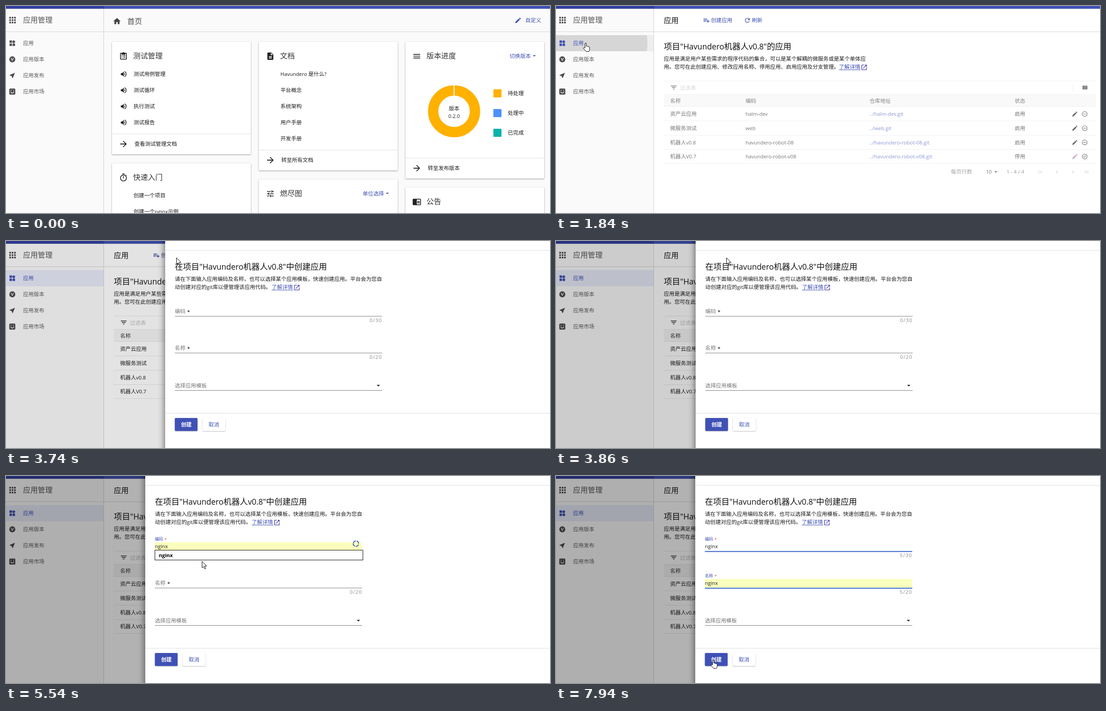
An HTML page for the animation above (8 s loop, 1211 by 462 pixels).

```html
<!DOCTYPE html>
<html lang="zh">
<head>
<meta charset="utf-8">
<style>
html, body { margin: 0; height: 100%; overflow: hidden; background: #fff; }
svg { display: block; width: 100vw; height: 100vh; font-family: "Open Sans", "Noto Sans CJK SC", "Noto Sans CJK", sans-serif; }
.card { filter: drop-shadow(0 1px 1.5px rgba(0,0,0,.4)); }
.button { filter: drop-shadow(0 1px 1px rgba(0,0,0,.28)); }
#sheet { filter: drop-shadow(-2px 0 7px rgba(0,0,0,.5)); }
</style>
</head>
<body>
<svg id="stage" viewBox="0 0 1211 462" xmlns="http://www.w3.org/2000/svg"></svg>
<script>
const BLUE = '#3f51b5', BODY = 11.83, HEAD = 16.4, TITLE = 18.2;

// Icons on a 24 unit grid
const ring = 'M12 2a10 10 0 1 0 0 20 10 10 0 0 0 0-20zm0 18a8 8 0 1 1 0-16 8 8 0 0 1 0 16z';
const icons = {
  apps: [4, 10, 16].map(x => [4, 10, 16].map(y => `M${x} ${y}h4v4h-4z`).join('')).join(''),
  widgets: 'M13 13v8h8v-8zM3 21h8v-8H3zM3 3v8h8V3zm13.66-1.31L11 7.34 16.66 13l5.66-5.66z',
  version: 'M12 2a10 10 0 1 0 0 20 10 10 0 0 0 0-20zM7 7h2.3l2.7 7.5L14.7 7H17l-4 10h-2z',
  send: 'M21 3L3 10.53v.98l6.84 2.65L12.48 21h.98z',
  market: 'M5 2h14a3 3 0 0 1 3 3v14a3 3 0 0 1-3 3H5a3 3 0 0 1-3-3V5a3 3 0 0 1 3-3zM7 6v3h2V6zm8 0v3h2V6zM6 12q1 6 6 6t6-6h-2q-1 4-4 4t-4-4z',
  home: 'M10 20v-6h4v6h5v-8h3L12 3 2 12h3v8z',
  edit: 'M3 17.25V21h3.75L17.81 9.94l-3.75-3.75zM20.71 7.04a1 1 0 0 0 0-1.41l-2.34-2.34a1 1 0 0 0-1.41 0l-1.83 1.83 3.75 3.75z',
  sound: 'M3 9v6h4l5 5V4L7 9zm13.5 3c0-1.77-1-3.29-2.5-4.03v8.05c1.5-.73 2.5-2.25 2.5-4.02zM14 3.23v2.06a7 7 0 0 1 0 13.42v2.06a9 9 0 0 0 0-17.54z',
  arrow: 'M12 4l-1.41 1.41L16.17 11H4v2h12.17l-5.58 5.59L12 20l8-8z',
  doc: 'M14 2H6a2 2 0 0 0-2 2v16a2 2 0 0 0 2 2h12a2 2 0 0 0 2-2V8zM16 18H8v-2h8zm0-4H8v-2h8zM13 9V3.5L18.5 9z',
  menu: 'M3 18h18v-2H3zm0-5h18v-2H3zm0-7v2h18V6z',
  tune: 'M3 17v2h6v-2zM3 5v2h10V5zm10 16v-2h8v-2h-8v-2h-2v6zM7 9v2H3v2h4v2h2V9zm14 4v-2H11v2zm-6-4h2V7h4V5h-4V3h-2z',
  timer: 'M9 1h6v2H9zM11 8h2v6h-2zM18 5.5l1.4-1.4 1.5 1.5L19.5 7zM12 4a9 9 0 1 0 0 18 9 9 0 0 0 0-18zm0 16a7 7 0 1 1 0-14 7 7 0 0 1 0 14z',
  book: 'M13 12h7v1.5h-7zm0-2.5h7V11h-7zm0 5h7V16h-7zM21 4H3a2 2 0 0 0-2 2v13a2 2 0 0 0 2 2h18a2 2 0 0 0 2-2V6a2 2 0 0 0-2-2zm0 15h-9V6h9z',
  list: 'M19 3h-4.2a3 3 0 0 0-5.6 0H5a2 2 0 0 0-2 2v14a2 2 0 0 0 2 2h14a2 2 0 0 0 2-2V5a2 2 0 0 0-2-2zM5 5h2v3h10V5h2v14H5zM7 10h2v2H7zm4 0h6v2h-6zM7 14h2v2H7zm4 0h6v2h-6z',
  filter: 'M10 18h4v-2h-4zM3 6v2h18V6zm3 7h12v-2H6z',
  add: 'M14 10H2v2h12zm0-4H2v2h12zm4 8v-4h-2v4h-4v2h4v4h2v-4h4v-2zM2 16h8v-2H2z',
  refresh: 'M17.65 6.35A8 8 0 1 0 19.73 14h-2.08A6 6 0 1 1 16.22 7.78L13 11h7V4z',
  open: 'M19 19H5V5h7V3H5a2 2 0 0 0-2 2v14a2 2 0 0 0 2 2h14a2 2 0 0 0 2-2v-7h-2zM14 3v2h3.59l-9.83 9.83 1.41 1.41L19 6.41V10h2V3z',
  stop: ring + 'M7 11v2h10v-2z',
  check: ring + 'M6.6 12.4L8 11l2.5 2.5L16 8l1.4 1.4-6.9 6.9z',
  left: 'M15.41 7.41L14 6l-6 6 6 6 1.41-1.41L10.83 12z',
  right: 'M10 6L8.59 7.41 13.17 12l-4.58 4.59L10 18l6-6z',
  bar: 'M11 6h2v12h-2z',
  caret: 'M7 10l5 5 5-5z',
  columns: 'M2 4h5.5v16H2zM9.25 4h5.5v16h-5.5zM16.5 4H22v16h-5.5z'
};

// Text is placed by its left edge and vertical centre; Latin runs are set a little smaller
const text = (x, y, s, size = BODY, fill = '#1c1c1c', attr = '') =>
  `<text x="${x}" y="${y + size * .37}" font-size="${size}" fill="${fill}" ${attr}>` +
  s.replace(/[ -~]+/g, m => `<tspan font-size=".963em">${m}</tspan>`) + '</text>';
const rect = (x, y, w, h, fill, attr = '') =>
  `<rect x="${x}" y="${y}" width="${w}" height="${h}" fill="${fill}" ${attr}/>`;
const icon = (name, x, y, size, fill = '#222', attr = '') =>
  `<path d="${icons[name]}" fill="${fill}" fill-rule="evenodd" transform="translate(${x - size / 2} ${y - size / 2}) scale(${size / 24})" ${attr}/>`;
const link = (x, y) => text(x, y, '了解详情', BODY, BLUE) +
  rect(x, y + 6, 48, 1, BLUE) + icon('open', x + 56, y + 1, 16, '#4a3fae');

function card(x, y, h, mark, title, foot) {
  return rect(x, y, 309, h, '#fff', 'class="card" rx="1"') + icon(mark, x + 25.5, y + 32, 20) +
    text(x + 47, y + 31, title, HEAD, '#333') +
    (foot ? rect(x, y + h - 46, 309, 1, '#dedede') + icon('arrow', x + 25.5, y + h - 23, 22) +
      text(x + 50, y + h - 23, foot) : '');
}

function home() {
  const lines = (x, y, list, mark) => list.map((s, i) =>
    text(x, y + 36 * i, s) + (mark ? icon(mark, x - 22, y + 36 * i, 17) : '')).join('');
  return rect(218, 6, 993, 456, '#fafafa') + icon('home', 247, 34, 19.5, '#444') +
    text(270, 33.5, '首页', HEAD, '#4d4d4d') + icon('edit', 1140, 32, 16, BLUE) + text(1156, 32, '自定义', BODY, BLUE) +
    card(236, 80, 251, 'list', '测试管理', '查看测试管理文档') +
    lines(284, 152, ['测试用例管理', '测试循环', '执行测试', '测试报告'], 'sound') +
    card(563, 80, 287, 'doc', '文档', '转至所有文档') +
    lines(611, 152, ['Havundero 是什么?', '平台概念', '系统架构', '用户手册', '开发手册']) +
    card(889, 80, 305, 'menu', '版本进度', '转至发布版本') +
    text(1121, 112, '切换版本', BODY, BLUE) + icon('caret', 1176, 111, 16, BLUE) +
    '<circle cx="997.5" cy="235" r="46.5" fill="none" stroke="#ffb100" stroke-width="23"/>' + rect(996.5, 176, 2, 24, '#fff') +
    text(997.5, 229, '版本', BODY, '#222', 'text-anchor="middle"') + text(997.5, 246, '0.2.0', BODY, '#222', 'text-anchor="middle"') +
    [['待处理', '#ffb100'], ['处理中', '#4d90fe'], ['已完成', '#0bb3ab']].map(([s, c], i) =>
      rect(1085, 186 + 44 * i, 18, 18, c, 'rx="1"') + text(1117, 195 + 44 * i, s)).join('') +
    card(236, 351, 130, 'timer', '快速入门') + lines(284, 423, ['创建一个项目', '创建一个nginx示例']) +
    card(563, 387, 100, 'tune', '燃尽图') + text(794, 419, '单位选择', BODY, BLUE) + icon('caret', 849, 418, 16, BLUE) +
    card(889, 405, 90, 'book', '公告');
}

function appList() {
  const rows = [['资产云应用', 'halm-dev'], ['微服务测试', 'web'], ['机器人v0.8', 'havundero-robot-08'], ['机器人V0.7', 'havundero-robot-v08']];
  const heads = [[254, '名称'], [422, '编码'], [698, '仓库地址'], [1021, '状态']];
  const row = ([name, code], i) => {
    const y = 241 + 31.7 * i, off = i == 3;
    return text(254, y, name) + text(422, y, code) + text(698, y, `../${code}.git`, BODY, BLUE) +
      text(1021, y, off ? '停用' : '启用') + icon('edit', 1155, y, 14.5, off ? '#a8729f' : '#000') +
      icon(off ? 'check' : 'stop', 1177, y, 14.5) + rect(240, Math.round(y + 15.3), 962, 1, '#e6e6e6');
  };
  const pager = [['bar', 1075], ['left', 1080], ['left', 1115], ['right', 1151], ['right', 1179], ['bar', 1184]];
  return rect(218, 6, 993, 456, '#fff') + text(240, 32, '应用', HEAD, '#111') +
    '<g id="create">' + icon('add', 335, 32, 16, 'currentColor') + text(345, 32, '创建应用', BODY, 'currentColor') + '</g>' +
    icon('refresh', 426, 32, 16, BLUE) + text(436, 32, '刷新', BODY, BLUE) +
    text(240, 90, '项目"Havundero机器人v0.8"的应用', TITLE, '#111', 'font-weight="500"') +
    text(240, 118, '应用是满足用户某些需求的程序代码的集合，可以是某个解耦的微服务或是某个单体应') +
    text(240, 136, '用。您可在此创建应用、修改应用名称、停用应用、启用应用及分支管理。') + link(630, 136) +
    '<g id="table">' + rect(240, 167, 962, 1, '#e6e6e6') + icon('filter', 262, 182, 17) + text(276, 183, '过滤表', BODY, '#bbb') +
    rect(1151, 172, 1, 20, '#e0e0e0') + icon('columns', 1177.5, 182, 12.5, '#000') +
    rect(240, 197, 962, 28, '#f5f5f5') + rect(240, 197, 962, 1, '#e6e6e6') + rect(240, 224, 962, 1, '#e6e6e6') +
    heads.map(([x, s]) => text(x, 212, s, BODY, '#333')).join('') + rows.map(row).join('') +
    text(879, 370, '每页行数', BODY, '#666') + text(957, 370, '10') + icon('caret', 979, 370, 16) +
    text(1003, 370, '1 - 4 / 4', BODY, '#555') + pager.map(([n, x]) => icon(n, x, 370, 15, '#bbb')).join('') + '</g>';
}

function sidebar() {
  const items = [['应用版本', 'version'], ['应用发布', 'send'], ['应用市场', 'market']];
  return rect(0, 6, 217, 456, '#fafafa') + icon('apps', 14.5, 31.5, 21.5, '#4b4b4b') + text(38, 31, '应用管理', HEAD, '#555') +
    rect(0, 65, 217, 36, '#e8eaf9', 'id="active"') +
    '<clipPath id="navClip"><rect y="65" width="217" height="36"/></clipPath>' +
    '<circle id="ripple" cx="64" cy="83" fill="#000" clip-path="url(#navClip)"/>' +
    '<g id="nav">' + icon('widgets', 14, 83, 16.4, 'currentColor') + text(38, 83, '应用', BODY, 'currentColor') + '</g>' +
    items.map(([s, n], i) => icon(n, 14, 119 + 36 * i, 16, '#4b4b4b') + text(38, 119 + 36 * i, s, BODY, '#5c5c5c')).join('') +
    rect(217, 6, 1, 456, '#d0d0d0') + rect(0, 57, 1211, 1, '#d3d3d3') +
    rect(0, 0, 218, 6, '#303f9f') + rect(218, 0, 993, 6, BLUE) + rect(0, 6, 1211, 1, '#000', 'opacity=".15"');
}

const field = (id, y, name) => `<g id="${id}"><g class="label">` + text(0, 0, name, BODY, 'currentColor') +
  text(27.5, 1, '*', BODY, '#000', 'class="star"') + '</g>' +
  rect(331.5, y - 9, 461.5, 19, '#faffbd', 'class="tint"') + text(331.5, y, 'nginx', BODY, '#222', 'class="value"') +
  rect(331.5, y + 10.5, 461.5, 1, '#777', 'class="line"') +
  text(793, y + 20, '', 11, '#888', 'class="count" text-anchor="end" letter-spacing="1.2"') +
  `<circle class="spin" cx="779" cy="${y - 6}" r="6" fill="none" stroke="${BLUE}" stroke-width="2" stroke-dasharray="7.42 2"/>` +
  '<g class="drop">' + rect(331.5, y + 8.5, 463, 22, '#fff', 'class="option" stroke="#000"') +
  text(340, y + 20, 'nginx', BODY, '#000', 'font-weight="700"') + '</g></g>';

const panel = () => rect(310, -20, 920, 502, '#fff', 'id="sheet"') + rect(310, 20.5, 901, 1, '#ddd') +
  text(331.5, 57, '在项目"Havundero机器人v0.8"中创建应用', TITLE, '#111', 'font-weight="500"') +
  text(331.5, 85, '请在下面输入应用编码及名称，也可以选择某个应用模板，快速创建应用。平台会为您自') +
  text(331.5, 103, '动创建对应的git库以便管理该应用代码。') + link(547, 103) +
  text(331.5, 323, '选择应用模板', BODY, '#777') + rect(331.5, 333, 461.5, 1, '#777') + icon('caret', 784.5, 322.5, 17) +
  field('name', 239, '名称') + field('code', 157, '编码') +
  rect(310, 384, 901, 1, '#ddd') + rect(331.5, 395, 50.5, 29, BLUE, 'class="button" rx="2"') +
  text(357, 410, '创建', BODY, '#fff', 'text-anchor="middle" font-weight="700"') +
  rect(393, 395, 51, 29, '#fff', 'class="button" rx="2"') + text(418.5, 410, '取消', BODY, BLUE, 'text-anchor="middle"');

const pointers = {
  arrow: 'M.5.5V15l3.4-3.2 2.5 5.7 2.2-1-2.5-5.5h4.6z',
  hand: 'M-1.4 11.5V2a1.4 1.4 0 0 1 2.8 0V7.5q2.6-.6 2.7.8 2.4-.6 2.6.8 2.2-.4 2.2 1.4V14q0 3-1.7 5.5H.9Q-.9 17-4.8 12.6q-.6-1.6.8-1.8 1.6-.1 2.6.7z',
  beam: 'M-3-8q3 0 3 1 0-1 3-1M0-7V7M-3 8q3 0 3-1 0 1 3 1'
};

const stage = document.getElementById('stage');
stage.innerHTML = `<g id="home">${home()}</g><g id="apps">${appList()}</g>` + sidebar() +
  rect(0, 0, 1211, 462, '#000', 'id="mask"') + `<g id="panel">${panel()}</g>` +
  '<path id="cursor" fill="#fff" stroke="#000" stroke-linejoin="round"/>';

const $ = id => document.getElementById(id);
const show = (el, on) => el.setAttribute('visibility', on ? 'visible' : 'hidden');
const ramp = (t, a, b) => Math.min(1, Math.max(0, (t - a) / (b - a)));
const smooth = p => p * p * (3 - 2 * p);
const within = (t, a, b) => t >= a && t < b;

// Pointer path: time, x, y
const path = [[550, 600, 450], [1330, 66, 82], [2290, 66, 82], [2850, 474, 87], [3160, 385, 44], [3300, 379, 37], [3860, 379, 37],
  [4360, 450, 148], [4580, 453, 155], [4900, 453, 155], [5500, 436, 190], [5610, 436, 190],
  [5720, 436, 180], [6300, 420, 240], [6460, 420, 240], [6900, 410.5, 262], [7280, 410.5, 262], [7900, 350, 410]];
const shapes = [[550, 'arrow'], [1280, 'hand'], [2450, 'arrow'], [2720, 'beam'], [2960, 'arrow'], [3160, 'hand'], [3640, 'arrow'],
  [4200, 'beam'], [5100, 'arrow'], [6080, 'beam'], [6600, 'arrow'], [7840, 'hand']];

// Moments at which each form field changes
const fields = [
  { id: 'code', y: 157, max: 30, focus: 4760, drop: 4900, hover: [5200, 5480], pick: 5220, close: 5740, done: 5900, plain: 6120 },
  { id: 'name', y: 239, max: 20, focus: 6140, drop: 6300, hover: [6620, 7280], pick: 6640, close: 7280, done: 7450, plain: 9000 }
];

function drawField(f, t) {
  const part = c => $(f.id).querySelector('.' + c);
  const p = smooth(ramp(t, f.focus, f.focus + 200)), on = t >= f.focus;
  part('label').setAttribute('transform', `translate(331.5 ${f.y - 16 * p}) scale(${1 - .23 * p})`);
  part('label').style.color = on ? BLUE : '#777';
  part('star').setAttribute('fill', on ? '#e53935' : '#000');
  part('line').setAttribute('fill', on ? '#2f5fc4' : '#777');
  part('line').setAttribute('height', on ? 2 : 1);
  part('count').textContent = `${t >= f.pick ? 5 : 0}/${f.max}`;
  show(part('value'), t >= f.pick);
  show(part('tint'), within(t, f.pick, f.plain));
  show(part('drop'), within(t, f.drop, f.close));
  part('option').setAttribute('fill', within(t, ...f.hover) ? '#bcdcf4' : '#fff');
  show(part('spin'), within(t, f.pick, f.done));
  part('spin').setAttribute('transform', `rotate(${t * .36} 779 ${f.y - 6})`);
  show(part('count'), !within(t, f.drop, f.close));
}

function drawCursor(t) {
  show($('cursor'), t >= path[0][0]);
  let i = path.findIndex(k => k[0] > t);
  if (i < 0) i = path.length - 1;
  const b = path[i], a = path[Math.max(0, i - 1)], p = smooth(ramp(t, a[0], b[0]));
  const shape = (shapes.filter(s => s[0] <= t).pop() || shapes[0])[1];
  $('cursor').setAttribute('d', pointers[shape]);
  $('cursor').setAttribute('transform', `translate(${a[1] + (b[1] - a[1]) * p} ${a[2] + (b[2] - a[2]) * p})`);
}

function draw(t) {
  const listed = t >= 1680;
  show($('home'), !listed);
  show($('apps'), listed);
  $('table').setAttribute('opacity', .6 + .4 * ramp(t, 2250, 2450));
  $('create').style.color = within(t, 3160, 3860) ? '#303f9f' : BLUE;
  $('nav').style.color = t >= 1280 ? BLUE : '#555';
  $('active').setAttribute('opacity', ramp(t, 1510, 1600));
  $('active').setAttribute('fill', t < 2050 ? '#eeeeef' : '#e8eaf9');
  $('ripple').setAttribute('r', 139 * ramp(t, 1510, 1840) + 60 * ramp(t, 1840, 1980));
  $('ripple').setAttribute('opacity', .1 * (1 - ramp(t, 1950, 2200)));

  // The sheet eases out hard while the backdrop darkens evenly
  const slide = (1 - ramp(t, 3560, 3960)) ** 5;
  show($('panel'), t >= 3560);
  $('panel').setAttribute('transform', `translate(${901 * slide} 0)`);
  $('mask').setAttribute('opacity', .3 * ramp(t, 3560, 4050));
  fields.forEach(f => drawField(f, t));
  drawCursor(t);
}

const start = performance.now();
(function tick() {
  draw((performance.now() - start) % 8000);
  requestAnimationFrame(tick);
})();
</script>
</body>
</html>
```
